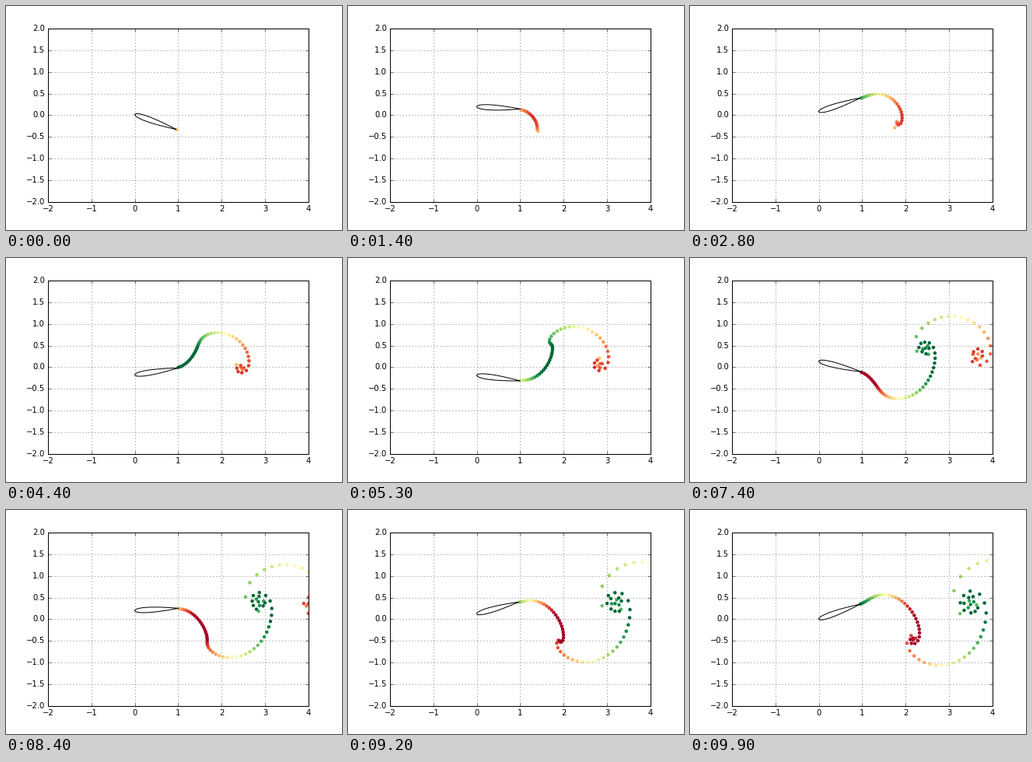
A matplotlib script that plays this animation: 432x288 px, repeating every 10000 ms.

```python
import numpy as np
import matplotlib.pyplot as plt
from matplotlib.animation import FuncAnimation

FRAMES = 100
DT = 0.04                  # time step, in chords travelled
OMEGA = 2 * np.pi * 0.375  # flapping frequency
HEAVE, PITCH = 0.2, np.radians(20)
PANELS = 25
CORE = 0.04                # vortex core radius for the free wake


def pose(t):
    """Leading edge and chord direction (complex) plus their velocities."""
    phase = OMEGA * t
    lead = 1j * HEAVE * np.sin(phase)
    chord = np.exp(-1j * PITCH * np.cos(phase))
    lead_vel = 1j * HEAVE * OMEGA * np.cos(phase)
    chord_vel = 1j * chord * PITCH * OMEGA * np.sin(phase)
    return lead, chord, lead_vel, chord_vel


def influence(points, vortices, core=0.0):
    """Velocity at each point from a unit vortex at each position."""
    d = points[:, None] - vortices[None, :]
    r2 = np.abs(d) ** 2 + core ** 2
    return 1j * d / (2 * np.pi * np.where(r2 > 0, r2, 1))


def simulate():
    """Shed one free vortex per step from a flapping plate."""
    i = np.arange(PANELS)
    s_vortex = (i + 0.25) / PANELS
    s_check = (i + 0.75) / PANELS
    wake = np.zeros(0, complex)
    gamma = np.zeros(0)
    history = []

    def plate(t):
        lead, chord, lead_vel, chord_vel = pose(t)
        bound = lead + s_vortex * chord
        check = lead + s_check * chord
        normal = np.conj(1j * chord)
        flow = 1 - (lead_vel + s_check * chord_vel)
        return bound, check, normal, flow, lead + chord

    bound, check, normal, flow, tail = plate(0)
    total = np.linalg.solve((influence(check, bound) * normal).real,
                            -(flow * normal).real).sum()

    for n in range(FRAMES):
        old_tail = tail
        bound, check, normal, flow, tail = plate((n + 1) * DT)
        fresh = tail + 0.5 * (old_tail + DT - tail)

        # No flow through the plate, and constant total circulation
        singular = np.append(bound, fresh)
        matrix = np.ones((PANELS + 1, PANELS + 1))
        matrix[:-1] = (influence(check, singular) * normal).real
        flow = flow + influence(check, wake) @ gamma
        rhs = np.append(-(flow * normal).real, total)
        strength = np.linalg.solve(matrix, rhs)
        total = strength[:-1].sum()

        wake = np.append(wake, fresh)
        gamma = np.append(gamma, strength[-1])
        history.append(wake.copy())

        vel = 1 + influence(wake, wake, CORE) @ gamma
        vel = vel + influence(wake, bound, CORE) @ strength[:-1]
        wake = wake + vel * DT
    return history, gamma


def airfoil(thickness=0.12, count=50):
    """Symmetric four-digit section with a closed trailing edge."""
    x = 0.5 * (1 + np.cos(np.linspace(0, np.pi, count)))
    y = 5 * thickness * (0.2969 * np.sqrt(x) - 0.1260 * x - 0.3516 * x**2
                         + 0.2843 * x**3 - 0.1036 * x**4)
    upper = x + 1j * y
    return np.concatenate([upper, np.conj(upper[::-1])])


history, gamma = simulate()
section = airfoil()
limit = 0.85 * np.abs(gamma).max()

plt.style.use('classic')
plt.rcParams.update({'font.family': 'DejaVu Sans', 'font.size': 10,
                     'savefig.dpi': 'figure'})
fig = plt.figure(figsize=(6, 4), dpi=72, facecolor='white')
ax = fig.add_axes([0.125, 0.125, 0.775, 0.775])
ax.set_xlim(-2, 4)
ax.set_ylim(-2, 2)
ax.set_xticks(np.arange(-2, 5))
ax.set_yticks(np.arange(-2, 2.1, 0.5))
ax.tick_params(labelsize=10)
ax.grid(True)

dots = ax.scatter([0], [0], c=[0], s=20, cmap='RdYlGn', vmin=-limit,
                  vmax=limit, edgecolors='none')
outline, = ax.plot([], [], 'k-', lw=1)
ax.set_xlim(-2, 4)
ax.set_ylim(-2, 2)


def update(n):
    lead, chord, *_ = pose((n + 1) * DT)
    shape = lead + section * chord
    outline.set_data(shape.real, shape.imag)
    wake = history[n]
    dots.set_offsets(np.column_stack([wake.real, wake.imag]))
    dots.set_array(gamma[:len(wake)])
    return dots, outline


anim = FuncAnimation(fig, update, frames=FRAMES, interval=100,
                     init_func=lambda: update(0), repeat=True, repeat_delay=0)
plt.show()
```
